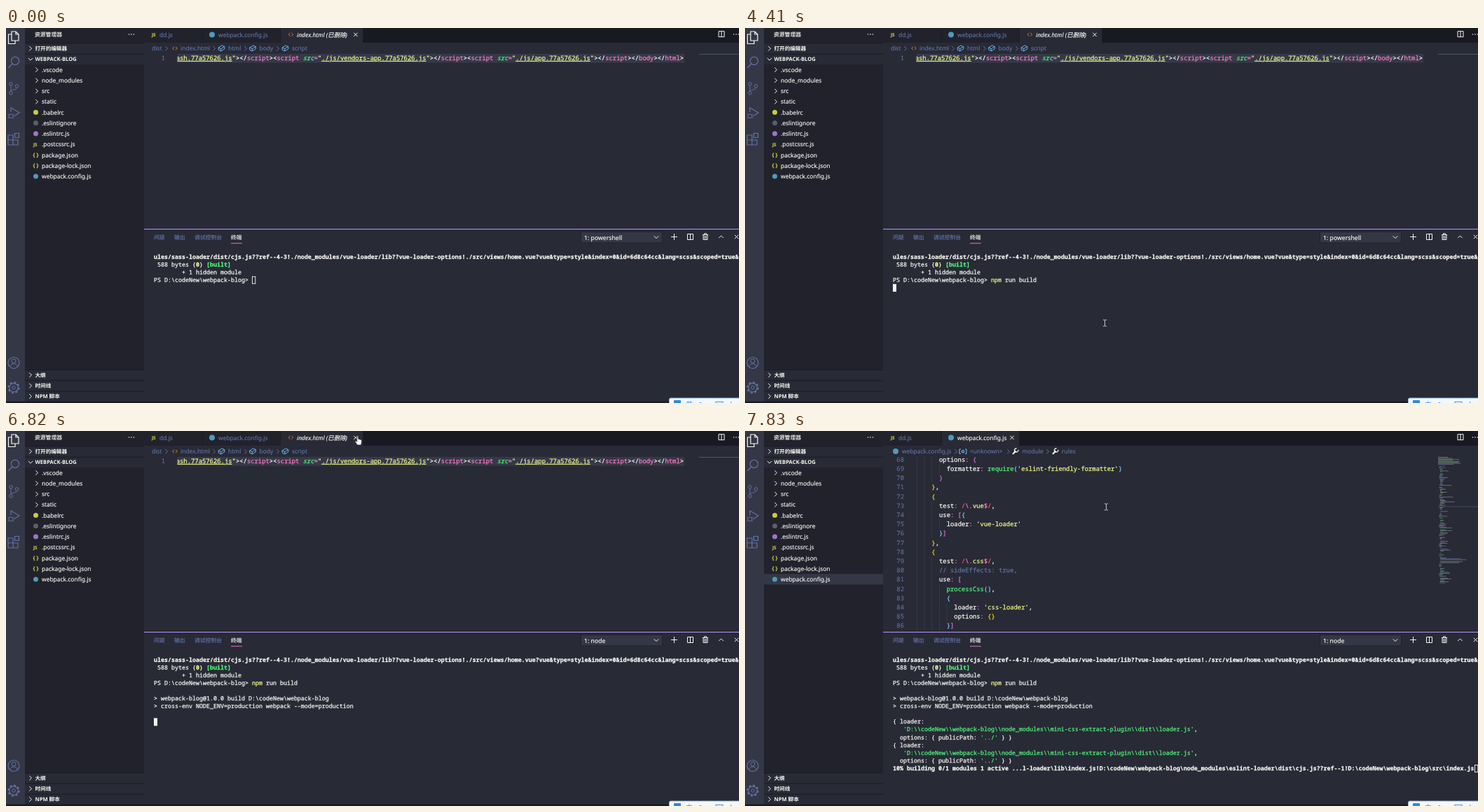
Recreate the animation shown at these times as an HTML page. Size 1046x536 px, loop 8 s.

```html
<!DOCTYPE html>
<html lang="zh">
<head>
<meta charset="utf-8">
<title>Build in the editor terminal</title>
<style>
html, body { margin: 0; width: 100%; height: 100%; overflow: hidden; background: #282a36; }
svg { display: block; width: 100vw; height: 100vh; }
text { white-space: pre; text-rendering: geometricPrecision; color: #f8f8f2; stroke-width: .25px; }
text, tspan { fill: currentColor; stroke: currentColor; }
.ui { font: 8.45px "Noto Sans", "Noto Sans CJK SC", "Noto Sans CJK", sans-serif; stroke-width: .15px; }
.cap { font-size: 7.8px; }
.head { font-size: 7.6px; font-weight: 700; stroke-width: 0; }
.it { font-style: italic; }
.drop { font-size: 8.7px; }
.js { font-size: 6.4px; font-weight: 700; color: #cbcb41; }
.term { font: 8.333px "Noto Sans Mono", "DejaVu Sans Mono", monospace; }
.code { font: 8.889px "Noto Sans Mono", "DejaVu Sans Mono", monospace; }
.num { color: #6272a4; text-anchor: end; stroke-width: .1px; }
.dim, .c { color: #6272a4; }
.w { color: #f8f8f2; }
.p { color: #ff79c6; }
.y { color: #f1fa8c; }
.u { color: #f1fa8c; text-decoration: underline; }
.g { color: #50fa7b; }
.i { color: #50fa7b; font-style: italic; }
.o { color: #ffd700; }
.m { color: #da70d6; }
.b { color: #87cefa; }
.r { color: #ff5555; }
.B { font-weight: 700; }
.Y { color: #f1fa8c; font-weight: 700; }
.G { color: #50fa7b; font-weight: 700; }
path, .line { fill: none; }
</style>
</head>
<body>
<svg id="stage" viewBox="0 0 1046 536" preserveAspectRatio="none"></svg>
<script>
const LOOP = 8000;
const RUN = 2530, ENTER = 4410, BANNER = 5250, CLOSE = 6900, OUT1 = 7450, OUT2 = 7520, PROGRESS = 7680;
const WHITE = '#f8f8f2', DIM = '#6272a4', BLUE = '#519aba', SKY = '#75beff';

const esc = s => s.replace(/&/g, '&amp;').replace(/</g, '&lt;');
const rect = (x, y, w, h, fill, more = '') => `<rect x="${x}" y="${y}" width="${w}" height="${h}" fill="${fill}" ${more}/>`;
const dot = (x, y, r, fill) => `<circle cx="${x}" cy="${y}" r="${r}" fill="${fill}"/>`;
const ring = (x, y, r, color, more = '') => `<circle class="line" cx="${x}" cy="${y}" r="${r}" stroke="${color}" ${more}/>`;
const path = (d, color, w = 1) => `<path d="${d}" stroke="${color}" stroke-width="${w}"/>`;
const text = (x, y, s, cls = '') => `<text x="${x}" y="${y}" class="ui ${cls}">${esc(s)}</text>`;
const during = (from, to, body) => `<g data-from="${from}" data-to="${to}">${body}</g>`;

// "§k" inside a string switches the following text to class k
function mono(x, y, kind, s) {
  const parts = ('§w' + s).split(/§(.)/).slice(1);
  let spans = '';
  for (let i = 0; i < parts.length; i += 2)
    if (parts[i + 1]) spans += `<tspan class="${parts[i]}">${esc(parts[i + 1])}</tspan>`;
  return `<text x="${x}" y="${y}" class="${kind}">${spans}</text>`;
}

const chevrons = { right: 'm-1.7 -3.2 3.2 3.2-3.2 3.2', down: 'm-3.2 -1.6 3.2 3.2 3.2-3.2', up: 'm-3.2 1.6 3.2-3.2 3.2 3.2' };
const chevron = (x, y, dir = 'right', color = WHITE) => path(`M${x} ${y}${chevrons[dir]}`, color);
const cross = (x, y) => path(`M${x - 2.7} ${y - 2.7}l5.4 5.4m0-5.4-5.4 5.4`, WHITE);
const split = (x, y) => path(`M${x - 4} ${y - 4}h8v8h-8zM${x} ${y - 4}v8`, WHITE);
const dots = (x, y) => [-3.4, 0, 3.4].map(d => dot(x + d, y, .8, WHITE)).join('');
const angle = (x, y) => path(`M${x - 1} ${y - 2.2}l-2.4 2.2 2.4 2.2m2-4.4 2.4 2.2-2.4 2.2`, '#e37933');
const cube = (x, y) => path(`M${x - 4.3} ${y - 1}l5-3 3.6 1.6v3.4l-5 3-3.6-1.7zl3.6 1.6 5-3m-5 3v3.3`, SKY, .9);
const wrench = (x, y) => path(`M${x - 4} ${y + 4}l4.5-4.5`, WHITE, 2) + path(`M${x + 3.8} ${y - 2.2}a2.7 2.7 0 1 1-2.2-2`, WHITE, 1.3);

function activityBar() {
  return rect(0, 0, 27, 536, '#343746') +
    path('M8 5h6l4 4v9H8zM8 9H3.5v13.500H13v-4M14 5v4h4', WHITE, 1.2) +
    ring(13, 47, 5.6, DIM, 'stroke-width="1.2"') + path('M9 51l-5.500 6', DIM, 1.3) +
    ring(7, 80, 2.3, DIM) + ring(15.5, 83, 2.3, DIM) + ring(7, 93, 2.3, DIM) +
    path('M7 82.300v8.400M15.500 85.300c0 4-8.500 2-8.500 5.400', DIM) +
    path('M7 120v-6l12 7-7.500 5', DIM, 1.2) + ring(7, 126, 3, DIM) + path('M2.500 123l2 1.500m5 0 2-1.500m-9 6 2-1.500m5 0 2 1.500', DIM) +
    path('M3 153h7v14H3zM3 160h14v7H10M12.500 150.500h6v6h-6z', DIM, 1.2) +
    ring(11, 478.5, 8, DIM, 'stroke-width="1.2"') + ring(11, 476, 3, DIM) + path('M5.500 484c2-5.500 9-5.500 11 0', DIM) +
    ring(11, 514, 6.2, DIM, 'stroke-width="1.2"') + ring(11, 514, 7.6, DIM, 'stroke-width="2" stroke-dasharray="3 2.97"') + ring(11, 514, 2.3, DIM);
}

function sideBar() {
  const section = (y, label, dir) =>
    rect(27, y - 7.5, 170, 15.2, '#282a36') + rect(27, y - 7.8, 170, .9, '#191a21') +
    chevron(35, y, dir) + text(41.5, y + 2.8, label, 'head');
  const js = y => `<text x="39" y="${y + 2.3}" class="ui js">JS</text>`;
  const braces = y => `<text x="38.500" y="${y + 2.3}" class="ui js" style="font-size:7.500px">{ }</text>`;
  const fold = y => chevron(44, y);
  const ball = color => y => dot(42.5, y, 3.5, color);
  const files = [
    ['.vscode', fold], ['node_modules', fold], ['src', fold], ['static', fold],
    ['.babelrc', ball('#cbcb41')], ['.eslintignore', ball('#5b6068')], ['.eslintrc.js', ball('#a074c4')],
    ['.postcssrc.js', js], ['package.json', braces], ['package-lock.json', braces], ['webpack.config.js', ball(BLUE)]
  ];
  return rect(27, 0, 170, 536, '#21222c') + text(41, 12.2, '资源管理器', 'cap') + dots(179, 9) +
    section(29.3, '打开的编辑器') + section(44.6, 'WEBPACK-BLOG', 'down') +
    during(CLOSE, LOOP, rect(27, 204.3, 170, 15.2, '#343746')) +
    files.map(([name, icon], i) => {
      const y = 59.7 + i * 15.23;
      return icon(y) + text(51, y + 3.1, name);
    }).join('') +
    section(496, '大纲') + section(511.3, '时间线') + section(526.5, 'NPM 脚本');
}

function tabs() {
  const tab = (x, w, active) => rect(x, 0, w, 21, active ? '#282a36' : '#21222c') + rect(x + w - .7, 0, .7, 21, '#191a21');
  return rect(197, 0, 849, 21, '#191a21') + tab(197, 84) +
    `<text x="208" y="12" class="ui js">JS</text>` + text(219, 12.6, 'dd.js', 'dim') +
    during(0, CLOSE, tab(281, 111) + text(303, 12.6, 'webpack.config.js', 'dim') +
      tab(392, 118, true) + angle(406.5, 9.3) + text(415, 12.6, 'index.html (已删除)', 'it') + cross(499, 9.5)) +
    during(CLOSE, LOOP, tab(281, 111, true) + text(303, 12.6, 'webpack.config.js') + cross(381, 9.5)) +
    dot(294, 9.5, 4, BLUE) + split(1021, 8.7) + dots(1042, 9);
}

function crumbs() {
  const label = (x, s) => text(x, 32.2, s, 'dim');
  const gaps = xs => xs.map(x => chevron(x, 29.3, 'right', DIM)).join('');
  return rect(197, 21, 849, 16, '#282a36') +
    during(0, CLOSE, label(208, 'dist') + angle(241, 29) + label(249, 'index.html') +
      cube(307.5, 29) + label(317, 'html') + cube(352, 29) + label(361.5, 'body') + cube(398.5, 29) + label(408, 'script') +
      gaps([229, 297, 342, 388])) +
    during(CLOSE, LOOP, dot(215, 29, 4, BLUE) + label(224, 'webpack.config.js') +
      path('M308 26h-2v6.500h2m6-6.500h2v6.500h-2', SKY) + ring(311, 29.2, 1.7, SKY, 'stroke-width="1.2"') +
      label(321, '<unknown>') + wrench(386, 29) + label(395.5, 'module') + wrench(443, 29) + label(452, 'rules') +
      gaps([301, 376, 432]));
}

function htmlView() {
  const script = file => `<§pscript §isrc§p=§y"§u${file}§y"§w></§pscript§w>`;
  const line = `§uash.77a57626.js§y"§w></§pscript§w>` + script('./js/vendors-app.77a57626.js') +
    script('./js/app.77a57626.js') + '</§pbody§w></§phtml§w>';
  return rect(244.5, 37, 723.5, 12.7, '#363949') +
    `<text x="227" y="46" class="code num">1</text>` +
    `<g clip-path="url(#lineClip)">${mono(242.7, 46, 'code', line)}</g>` +
    rect(989, 36.8, 57, .9, '#5b6a78');
}

function minimap() {
  let seed = 7, out = '';
  const rnd = () => (seed = seed * 16807 % 2147483647) / 2147483647;
  const inks = ['#a0a67c', '#8b909c', '#4fa070', '#8b909c', '#6272a4'];
  for (let n = 0; n < 131; n++) {
    const top = n < 9, dense = n > 104 && n < 111;
    const indent = top ? 0 : 1 + 2.2 * Math.abs(Math.sin(n * .31));
    const w = top ? 14 + rnd() * 22 : dense ? 16 + rnd() * 22 : 2 + rnd() * rnd() * 19;
    const ink = inks[top ? n % 3 : Math.floor(rnd() * inks.length)];
    if (rnd() > .12) out += rect((989 + indent).toFixed(1), (37.3 + n * 1.38).toFixed(2), w.toFixed(1), .8, ink, 'opacity=".8"');
  }
  return out + rect(989, 107.7, 57, .9, '#44506b');
}

function configView() {
  const lines = [
    [6, 'options§p:§m {'],
    [8, 'formatter§p: §grequire§b(§y\'eslint-friendly-formatter\'§b)'],
    [6, '§m}'], [4, '§o}§w,'], [4, '§o{'],
    [6, 'test§p:§r /§p\\.§yvue§p$§r/§w,'],
    [6, 'use§p:§m [§b{'], [8, 'loader§p:§y \'vue-loader\''], [6, '§b}§m]'],
    [4, '§o}§w,'], [4, '§o{'],
    [6, 'test§p:§r /§p\\.§ycss§p$§r/§w,'],
    [6, '§c// sideEffects: true,'],
    [6, 'use§p:§m ['], [8, '§gprocessCss§b()§w,'], [8, '§b{'],
    [10, 'loader§p:§y \'css-loader\'§w,'], [10, 'options§p:§o {}'], [8, '§b}§m]']
  ];
  return lines.map(([indent, s], i) => {
    const y = 43.8 + i * 13.2;
    let out = `<text x="227" y="${y}" class="code num">${68 + i}</text>`;
    for (let k = 0; k < indent; k += 2) out += rect(245 + k * 5.333, y - 9.6, .7, 13.2, '#3d404e');
    return out + mono(245 + indent * 5.333, y, 'code', s);
  }).join('') + minimap();
}

function terminal() {
  const rowY = r => 329.5 + r * 11.11;
  const row = (r, s) => mono(211, rowY(r), 'term', s);
  const solid = (r, c) => rect(211 + c * 5, rowY(r) - 8, 5, 11, WHITE);
  const hollow = (r, c) => rect(211.5 + c * 5, rowY(r) - 7.5, 4.3, 10, 'none', `stroke="${WHITE}" stroke-width=".9"`);
  const loader = r => row(r, '{ loader:') +
    row(r + 1, "   §g'D:\\\\codeNew\\\\webpack-blog\\\\node_modules\\\\mini-css-extract-plugin\\\\dist\\\\loader.js'§w,") +
    row(r + 2, "  options: { publicPath: §g'../'§w } }");
  const name = (from, to, s) => during(from, to, text(825, 302.7, '1: ' + s, 'drop'));
  const progress = (from, to, s) => during(from, to, row(14, '§B' + s) + hollow(14, s.length));
  const root = 'D:\\codeNew\\webpack-blog\\';

  return rect(197, 287, 849, 249, '#282a36') + rect(197, 287, 849, 1, '#bd93f9') +
    text(211, 302, '问题', 'cap dim') + text(240, 302, '输出', 'cap dim') + text(269, 302, '调试控制台', 'cap dim') +
    text(321, 302, '终端', 'cap') + rect(321, 307.3, 16, .9, '#ff79c6') +
    rect(820.5, 291.5, 116, 15.5, '#343746', 'stroke="#191a21" stroke-width=".6"') + chevron(928, 299, 'down') +
    name(0, 4510, 'powershell') + name(4510, 4650, 'cmd') + name(4650, LOOP, 'node') +
    path('M949 298.500h9M953.500 294v9', WHITE) + split(976.5, 298.5) +
    path('M994 295.500h8M996.500 295v-1.200h3v1.200M995 296v6.500h6V296M997 297v4.500m2 0V297', WHITE) +
    chevron(1020.5, 298.5, 'up') + cross(1042.5, 298.5) +
    row(0, '§Bules/sass-loader/dist/cjs.js??ref--4-3!./node_modules/vue-loader/lib??vue-loader-options!./src/views/home.vue?vue&type=style&index=0&id=6d8c64cc&lang=scss&scoped=true&') +
    row(1, ' 588 bytes {§Y0§w} §G[built]') + row(2, '        + 1 hidden module') +
    row(3, 'PS D:\\codeNew\\webpack-blog>') +
    during(0, 470, hollow(3, 28)) + during(470, RUN, solid(3, 28)) +
    during(RUN, LOOP, mono(351, rowY(3), 'term', '§ynpm§w run build')) +
    during(RUN, ENTER, solid(3, 41)) + during(ENTER, BANNER, solid(4, 0)) +
    during(BANNER, LOOP, row(5, '> webpack-blog@1.0.0 build D:\\codeNew\\webpack-blog') +
      row(6, '> cross-env NODE_ENV=production webpack --mode=production')) +
    during(BANNER, CLOSE, solid(8, 0)) + during(CLOSE, OUT1, hollow(8, 0)) +
    during(OUT1, LOOP, loader(8)) + during(OUT1, OUT2, hollow(11, 0)) +
    during(OUT2, LOOP, loader(11)) + during(OUT2, PROGRESS, hollow(14, 0)) +
    progress(PROGRESS, 7760, '0% compiling') +
    progress(7760, 7830, '10% building 0/0 modules 0 active') +
    progress(7830, LOOP, `10% building 0/1 modules 1 active ...l-loader\\lib\\index.js!${root}node_modules\\eslint-loader\\dist\\cjs.js??ref--1!${root}src\\index.js`);
}

function inputBar() {
  const mode = s => `<text x="970" y="541.500" class="ui" style="font-size:10px;color:#3d8fe0">${s}</text>`;
  return rect(0, 533.7, 1046, 2.3, '#191a21') +
    rect(946.5, 529, 104, 12, '#f3f8fd', 'rx="2" stroke="#8dbbe6"') + rect(953, 532, 10, 8, '#2f86dd', 'rx="1"') +
    during(0, 470, mode('英')) + during(470, LOOP, mode('中')) +
    dot(991, 536.5, 1.6, '#3d8fe0') + rect(1013, 534.3, 10, 4, 'none', 'stroke="#3d8fe0"') + rect(1034, 534.3, 1.2, 3, '#3d8fe0');
}

const pointers = `<g id="beam">${path('M-2.500 -4.500h2l.500.500.500-.500h2M0-4v8M-2.500 4.500h2l.500-.500.500.500h2', '#d8d8d8', .9)}</g>
  <g id="hand"><path d="M-1.500-6.500q1.300-1 1.800.400v3.600l4 1q1 .300.900 1.600l-.800 4.900q-.200 1-1.200 1h-3.700q-.800 0-1.300-.800l-2.600-4.200q-.200-1.300 1.200-1l1.400 1.400z" style="fill:#fff" stroke="#222" stroke-width=".7"/></g>
  <g id="arrow"><path d="M0-6v10.500l2.400-2.200 1.600 3.700 1.500-.700-1.600-3.500h3.300z" style="fill:#fff" stroke="#222" stroke-width=".6"/></g>`;

const stage = document.getElementById('stage');
stage.innerHTML = '<clipPath id="lineClip"><rect x="244.500" y="36" width="745" height="15"/></clipPath>' +
  rect(0, 0, 1046, 536, '#282a36') +
  during(0, CLOSE, htmlView()) + during(CLOSE, LOOP, configView()) +
  during(5490, 5960, rect(719, 278.5, 265, 8, '#44475a', 'opacity=".45"')) +
  crumbs() + tabs() + terminal() + activityBar() + sideBar() + inputBar() + `<g id="mouse">${pointers}</g>`;

// the pointer jumps to each place at its time and rests there
const moves = [
  [70, 700, 520], [150, 648, 494], [230, 598, 466], [310, 556, 444], [390, 526, 428], [470, 513.5, 421.7],
  [4960, 512.5, 421.7], [5040, 512, 421.5], [5330, 515, 408], [5410, 522, 372], [5490, 532, 318],
  [5570, 540, 254.5], [5660, 540, 197], [5740, 538, 142], [5810, 532, 96], [5890, 524, 58], [5960, 517, 32],
  [6040, 514, 19], [6120, 515, 16], [6200, 512, 15], [6280, 509, 14.5], [6350, 506, 14], [6500, 502.5, 14],
  [6980, 506, 26], [7060, 511, 58], [7140, 515, 92], [7220, 515.5, 108.5]
];
const mouse = document.getElementById('mouse');
const shapes = ['beam', 'hand', 'arrow'].map(id => document.getElementById(id));
const timed = [...stage.querySelectorAll('[data-from]')].map(el => ({ el, from: +el.dataset.from, to: +el.dataset.to }));
const show = (el, on) => { el.style.display = on ? '' : 'none'; };

function draw() {
  const t = performance.now() % LOOP;
  for (const { el, from, to } of timed) show(el, t >= from && t < to);
  const at = moves.filter(m => m[0] <= t).pop();
  show(mouse, at);
  if (at) {
    const [, x, y] = at;
    mouse.setAttribute('transform', `translate(${x} ${y})`);
    const kind = y > 37 ? 'beam' : t < CLOSE ? 'hand' : 'arrow';
    shapes.forEach(el => show(el, el.id === kind));
  }
  requestAnimationFrame(draw);
}
draw();
</script>
</body>
</html>
```
